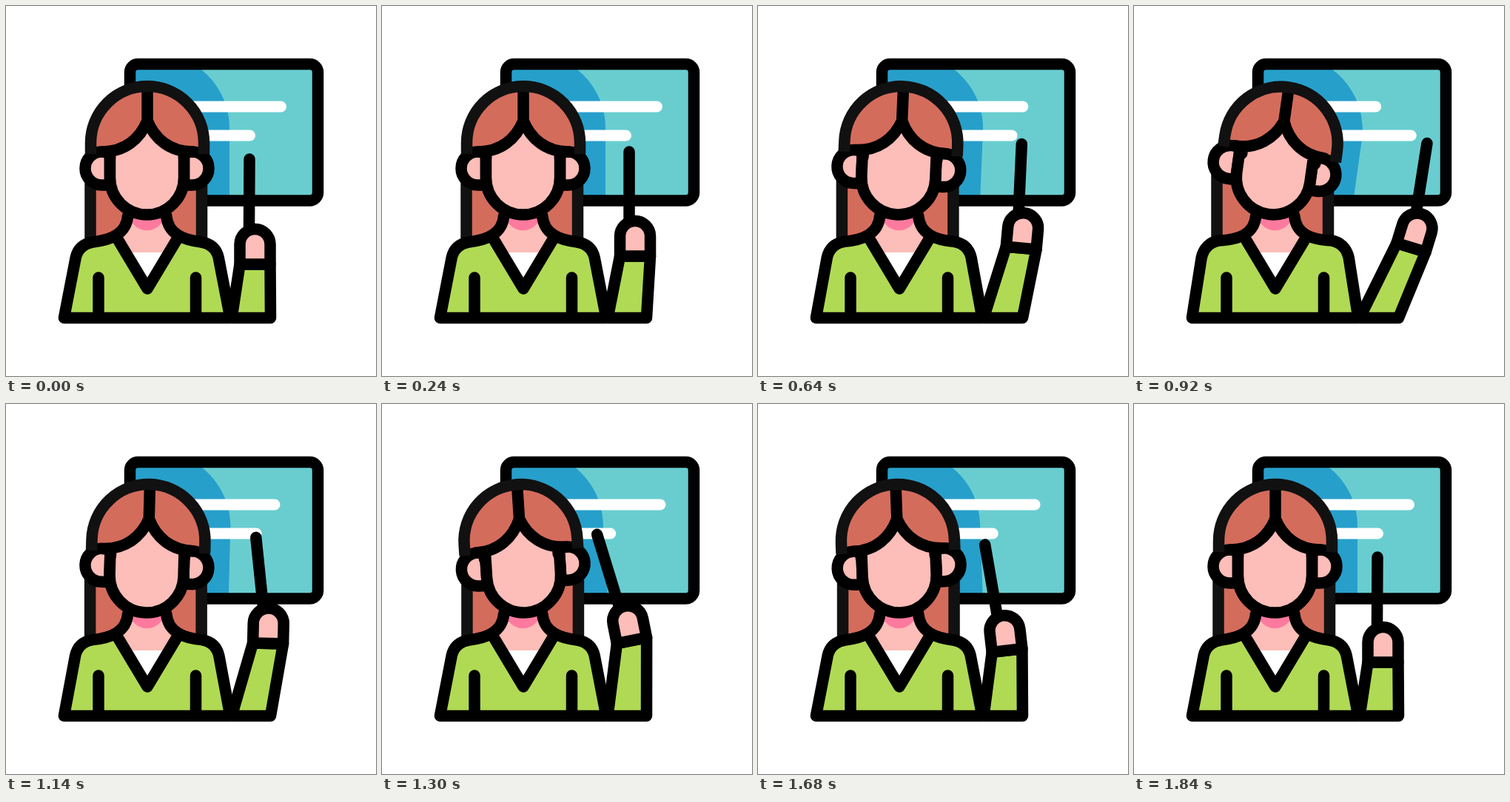
An HTML page for the animation above (2000 ms loop, 500 px wide and 500 px high).

```html
<!DOCTYPE html>
<html lang="en">
<head>
<meta charset="utf-8">
<title>Teacher at the board</title>
<style>
html, body { margin: 0; width: 100%; height: 100%; overflow: hidden; background: #fff; }
svg { display: block; width: 100vw; height: 100vh; }
.skin { fill: #fdbdb8; }
.hair { fill: #d46c5c; }
.green { fill: #b0da54; }
.line { stroke: #000; stroke-width: 15.5; stroke-linecap: round; stroke-linejoin: round; }
.line:not(.skin, .green) { fill: none; }
.dark { stroke: #111; stroke-linecap: butt; }
.chalk { stroke: #fff; stroke-width: 15; }
</style>
</head>
<body>
<svg viewBox="0 0 500 500">
  <defs>
    <clipPath id="screen"><rect x="167.5" y="78.5" width="254" height="184.5" rx="11"/></clipPath>
    <path id="body"/>
  </defs>

  <!-- board -->
  <g clip-path="url(#screen)">
    <rect x="160" y="70" width="270" height="200" fill="#69cdd0"/>
    <path id="shade" fill="#279fcb" d="M100 300V165A95 95 0 0 1 302 165V300Z"/>
  </g>
  <path id="text1" class="line chalk"/>
  <path id="text2" class="line chalk"/>
  <rect class="line" x="167.5" y="78.5" width="254" height="184.5" rx="11"/>

  <!-- pointing arm -->
  <path id="rod" class="line"/>
  <path id="sleeve" class="line green"/>
  <path id="hand" class="line skin" d="M-20.5 27V0a20.5 20.5 0 0 1 41 0V27Z"/>

  <!-- long hair behind the shoulders -->
  <g id="back">
    <path class="hair" d="M114 200H264.5V325H114Z"/>
    <path class="line dark" d="M114 200V322M264.5 200V322"/>
  </g>

  <!-- body -->
  <use href="#body" class="green"/>
  <path class="skin" d="M164.5 275H216.5C217 300 220 309 230 317L191 382L152 317C161 309 164 300 164.5 275Z"/>
  <path fill="#fd7a9f" d="M165 280C172 311 209 311 216 280Z"/>
  <path fill="#fff" d="M161 333H221L191 382Z"/>
  <use href="#body" class="line"/>
  <path class="line" d="M152 317L191 382L230 317M125 367V421M256.5 367V421"/>

  <!-- head -->
  <path id="crown" class="hair" d="M114.5 205V185a76.5 76.5 0 0 1 153 0V205Z"/>
  <g id="face" class="line skin">
    <path d="M140.5 197H129.5a22.5 22.5 0 0 0 0 45H140.5ZM240.5 197H251.5a22.5 22.5 0 0 1 0 45H240.5Z"/>
    <path d="M140.5 200V232a50 50 0 0 0 100 0V200"/>
  </g>
  <g id="fringe">
    <path class="skin" d="M191 155C182 178 163 195 140.5 197V202H240.5V197C219 195 200 178 191 155Z"/>
    <path class="line" d="M191 112V155C181 180 160 197 130 197M191 155C201 180 222 197 252 197M140.5 202v4M240.5 202v4"/>
    <path class="line dark" d="M114.5 200V185a76.5 76.5 0 0 1 153 0V200"/>
  </g>
</svg>
<script>
const LOOP = 2000;
const rest   = { tilt: 0,  x: 336.5, y: 322,   turn: 0,   tipX: 329, tipY: 207 };
const raised = { tilt: 0,  x: 347.5, y: 300,   turn: 0,   tipX: 339, tipY: 187 };
const right  = { tilt: 8,  x: 382.5, y: 300.5, turn: 17,  tipX: 396, tipY: 185.5 };
const left   = { tilt: -4, x: 331,   y: 293,   turn: -12, tipX: 288, tipY: 176 };
const keys = [[0, rest], [480, raised], [920, right], [1340, left], [1540, left], [1840, rest], [LOOP, rest]];

const ease = u => u * u * (3 - 2 * u);

function poseAt(t) {
  const i = keys.findIndex(([time]) => time > t);
  const [t0, from] = keys[i - 1], [t1, to] = keys[i];
  const k = ease((t - t0) / (t1 - t0)), pose = {};
  for (const name in from) pose[name] = from[name] + (to[name] - from[name]) * k;
  return pose;
}

const set = (id, name, value) => document.getElementById(id).setAttribute(name, value);
const lean = (id, angle, pivotY) => set(id, 'transform', `rotate(${angle} 190.5 ${pivotY})`);

// half of the body outline, from the neck down; side is -1 or 1
function half(side, shrug) {
  const p = (dx, y) => `${190.7 + side * dx} ${y}`;
  const out = 3 * shrug, up = 2 * shrug;
  return [p(26, 283), p(28, 309), p(50, 316), p(73 + out, 319 - up),
          p(85 + out, 321 - up), p(93.5 + out, 327), p(96.5 + out, 340), p(112.3, 421.5)];
}

function bodyPath(shrug) {
  const l = half(-1, shrug), r = half(1, shrug).reverse();
  return `M${l[0]}C${l.slice(1, 7)}L${l[7]}L${r[0]}L${r[1]}C${r.slice(2)}`;
}

function draw(t) {
  const { tilt, x, y, turn, tipX, tipY } = poseAt(t);
  lean('crown', tilt, 240);
  lean('fringe', tilt, 240);
  lean('face', tilt, 216);
  lean('shade', tilt, 215);
  set('back', 'transform', `translate(${-tilt / 4})`);
  set('body', 'd', bodyPath(Math.max(0, tilt / 8)));

  // the two lines of text trade length as she turns
  set('text1', 'd', `M240 136H${371.5 - tilt * (tilt > 0 ? 5.6 : 1.2)}`);
  set('text2', 'd', `M240 175H${329.5 + tilt * 5.6}`);

  const a = turn * Math.PI / 180, sin = Math.sin(a), cos = Math.cos(a);
  const onHand = (dx, dy) => `${x + dx * cos - dy * sin} ${y + dx * sin + dy * cos}`;
  set('hand', 'transform', `translate(${x} ${y}) rotate(${turn})`);
  set('rod', 'd', `M${tipX} ${tipY}L${onHand(-8, -24)}`);
  set('sleeve', 'd', `M305 421.5L${onHand(-20.5, 27)}L${onHand(20.5, 27)}L357.5 421.5Z`);
}

const start = performance.now();
function tick() {
  draw((performance.now() - start) % LOOP);
  requestAnimationFrame(tick);
}
tick();
</script>
</body>
</html>
```
